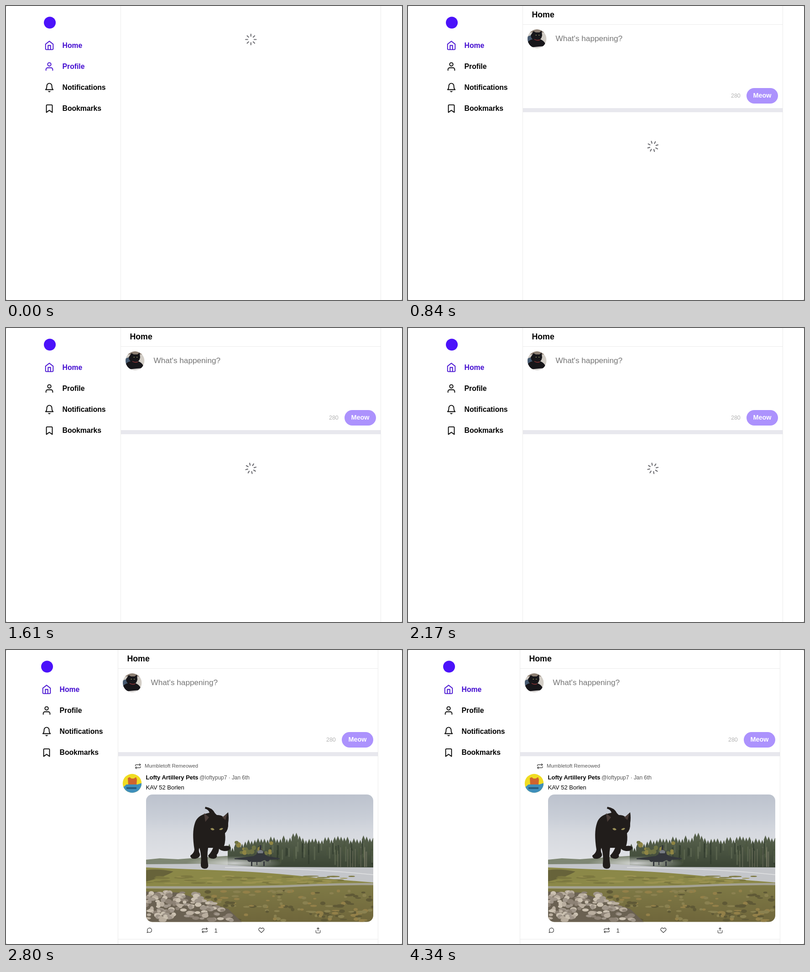
These frames come from a looping animation (868x645 px, 4.41 s). An HTML page:

```html
<!DOCTYPE html>
<html lang="en">
<head>
<meta charset="utf-8">
<title>Feed loading</title>
<style>
  html, body { margin: 0; width: 100%; height: 100%; overflow: hidden; background: #b8b8b8; }
  svg { display: block; }
  text { font-family: "Liberation Sans", Arial, Helvetica, sans-serif; white-space: pre; }
  .b { font-weight: 700; }
  .icon { fill: none; stroke: currentColor; stroke-width: 2; stroke-linecap: round; stroke-linejoin: round; }
  .nav { color: #000; fill: currentColor; font-size: 15.7px; font-weight: 700; }
  .nav.on { color: #430cd0; }
  .spin { stroke: #707075; stroke-width: 2.2; stroke-linecap: round; }
  .line { fill: #ebebeb; }
</style>
</head>
<body>
<svg width="868" height="645" viewBox="0 0 868 645">
  <defs>
    <linearGradient id="sky" x1="0" y1="0" x2="0" y2="1">
      <stop offset="0" stop-color="#bcc2cd"/><stop offset=".3" stop-color="#c9ced7"/>
      <stop offset=".5" stop-color="#d6d9df"/><stop offset="1" stop-color="#e4e5e8"/>
    </linearGradient>
    <linearGradient id="wood" x1="0" y1="0" x2="0" y2="1">
      <stop offset="0" stop-color="#5a644f"/><stop offset="1" stop-color="#3a4434"/>
    </linearGradient>
    <linearGradient id="field" x1="0" y1="0" x2="0" y2="1">
      <stop offset="0" stop-color="#7f7a46"/><stop offset="1" stop-color="#6f663b"/>
    </linearGradient>
    <radialGradient id="mist">
      <stop offset="0" stop-color="#e6e7e7" stop-opacity=".85"/><stop offset="1" stop-color="#e6e7e7" stop-opacity="0"/>
    </radialGradient>
    <clipPath id="frame"><rect x="307" y="317" width="498" height="279.5" rx="14"/></clipPath>
    <clipPath id="face"><circle cx="282.7" cy="72" r="20.7"/></clipPath>
    <clipPath id="face2"><circle cx="276.5" cy="292.5" r="20.7"/></clipPath>
  </defs>

  <rect width="868" height="645" rx="3" fill="#fff"/>

  <g id="shell">
    <rect class="line" x="251" width="1" height="645"/>
    <rect class="line" x="821" width="1" height="645"/>
    <circle cx="96" cy="36.5" r="13" fill="#4b12fa"/>
    <g id="nav"></g>
    <g id="compose">
      <text class="b" x="271.4" y="25" font-size="17.8">Home</text>
      <rect class="line" x="252" y="40" width="569" height="1"/>
      <g clip-path="url(#face)">
        <rect x="261" y="50" width="44" height="44" fill="#d2cdc6"/>
        <rect x="261" y="50" width="44" height="8" fill="#8d7f73"/>
        <path d="M261 68q7-6 15-2l2 14h-17z" fill="#475a70"/>
        <path d="M261 86h44v8h-44z" fill="#dcd9d8"/>
        <path d="M275 55l5 3h8l5-4 1 11q-1 5-4 8 8 3 11 10l-2 5-12 1-20 2-6-8q2-8 12-10-4-4-4-9z" fill="#17161a"/>
        <path d="M277 73q6 4 12 1" fill="none" stroke="#8f3436" stroke-width="1.5"/>
        <path d="M279.500 64h2.500M286 64h2.500" stroke="#8a9060" stroke-width="1.500"/>
      </g>
      <text x="323.500" y="77" font-size="17.200" fill="#757575">What's happening?</text>
      <text x="708" y="201" font-size="12.400" fill="#b3b3b3">280</text>
      <rect x="742" y="180" width="69" height="34" rx="17" fill="#ac92fd"/>
      <text class="b" x="776.500" y="201.300" font-size="14.400" fill="#fff" text-anchor="middle">Meow</text>
      <rect x="252" y="224" width="569" height="9" fill="#e8e8ee"/>
    </g>
  </g>

  <g id="pageSpin" class="spin"></g>
  <g id="feedSpin" class="spin"></g>

  <g id="feed">
    <text x="304" y="258" font-size="11.4" fill="#555">Mumbletoft Remeowed</text>
    <text class="b" x="306.5" y="284.3" font-size="13">Lofty Artillery Pets</text>
    <text x="424" y="284.3" font-size="11.9" fill="#555">@loftypup7 · Jan 6th</text>
    <text x="306.5" y="306.3" font-size="13">KAV 52 Borlen</text>
    <text x="456.5" y="619.5" font-size="13" fill="#333">1</text>
    <rect class="line" x="246" y="634" width="569" height="1"/>
    <g clip-path="url(#face2)">
      <rect x="255" y="271" width="43" height="43" fill="#f0dc22"/>
      <path d="M267 281l4-2 4 3h5l5-3 2 5-1 13h-18z" fill="#cf642e"/>
      <path d="M257 301l7-6h24l9-3 2 22h-42z" fill="#3f8fbb"/>
      <path d="M264 301h22v4h-22z" fill="#275c80"/>
    </g>
    <g clip-path="url(#frame)">
      <rect x="307" y="317" width="498" height="170" fill="url(#sky)"/>
      <path d="M307 460l30-3 40 2 40-3 80-5v24h-190z" fill="#7e8673"/>
      <path id="trees" fill="url(#wood)"/>
      <g id="leaves"></g>
      <ellipse cx="500" cy="468" rx="105" ry="16" fill="url(#mist)"/>
      <path d="M307 470l130-1 120 7 248 1v36l-498-30z" fill="#c4c6ca"/>
      <path d="M480 477q190 2 325 16" fill="none" stroke="#e2e3e4" stroke-width="1.5"/>
      <path d="M307 477q70 3 150 6 130 5 225 17l123 10v22h-498z" fill="#8b8848"/>
      <path d="M307 483q25-4 60 3-20 12-60 22z" fill="#67633a"/>
      <path d="M307 518q200 1 300-2 110-5 198-5v5q-100 1-200 6 -140 3-298 1z" fill="#a5a394"/>
      <path d="M307 524q160 0 300-3 110-6 198-5v81h-498z" fill="url(#field)"/>
      <g id="ground"></g>
      <g fill="#34373c">
        <path d="M501 457l42-5 6-4h18l6 4 27 5v2l-34 2-8 4h-18l-8-4-31-2z"/>
        <circle cx="558" cy="448" r="9"/>
        <path d="M556.500 428h3l1.500 14h-6z"/>
        <circle cx="534" cy="460" r="5"/><circle cx="573" cy="459" r="5"/>
        <path d="M537 464h3v10h-3zM564 464h3v10h-3zM549 464h2v8h-2z"/>
      </g>
      <path d="M551 442q7-7 13 0l-1 4h-11z" fill="#777c83"/>
      <path d="M437 344Q452 346 458 358L462 362Q472 362 476 366L487 356Q489 368 487 380
        Q488 394 480 402 482 418 478 430 490 428 492 434 490 442 478 441 470 440 467 436
        466 446 462 449 464 457 455 458 444 458 443 451 450 444 454 434L443 434
        Q440 452 443 470 445 480 435 480 426 479 427 470 429 450 424 434 421 440 425 447
        427 455 415 458 404 459 404 451 412 446 413 438 407 400 414 380
        418 366 434 360L446 357Q444 350 436 348z" fill="#211d1b"/>
      <path d="M434 358l11 9-8 10zM485 359l-4 14-7-6z" fill="#4a3c38"/>
      <path d="M448 392q5-4 9 2-5 4-9-2zM467 394q4-5 9-3-3 6-9 3z" fill="#9a8f58"/>
    </g>
    <g id="acts" color="#333"></g>
  </g>
</svg>
<script>
const $ = id => document.getElementById(id);

const shapes = {
  home: 'M3 9l9-7 9 7v11a2 2 0 0 1-2 2H5a2 2 0 0 1-2-2zM9 22V12h6v10',
  user: 'M20 21v-2a4 4 0 0 0-4-4H8a4 4 0 0 0-4 4v2M16 7a4 4 0 1 1-8 0a4 4 0 1 1 8 0z',
  bell: 'M18 8A6 6 0 0 0 6 8c0 7-3 9-3 9h18s-3-2-3-9M13.7 21a2 2 0 0 1-3.4 0',
  mark: 'M19 21l-7-5-7 5V5a2 2 0 0 1 2-2h10a2 2 0 0 1 2 2z',
  chat: 'M21 11.5a8.5 8.5 0 0 1-12.8 7.6L3 21l1.9-5.7A8.5 8.5 0 1 1 21 11.5z',
  loop: 'M18 2l4 4-4 4M2 11V9a3 3 0 0 1 3-3h17M6 22l-4-4 4-4M22 13v2a3 3 0 0 1-3 3H2',
  heart: 'M12 21l-8.8-8.6a5.5 5.5 0 0 1 7.8-7.8l1 1 1-1a5.5 5.5 0 0 1 7.8 7.8z',
  share: 'M4 12v8a2 2 0 0 0 2 2h12a2 2 0 0 0 2-2v-8M16 6l-4-4-4 4M12 2v13'
};
const icon = (name, cx, cy, k) =>
  `<path class="icon" transform="translate(${cx} ${cy}) scale(${k}) translate(-12 -12)" d="${shapes[name]}"/>`;

$('nav').innerHTML = [['home', 'Home'], ['user', 'Profile'], ['bell', 'Notifications'], ['mark', 'Bookmarks']]
  .map(([name, label], i) => {
    const y = 86.5 + 46.2 * i;
    return `<g class="nav" id="${name}">${icon(name, 95, y, .92)}<text x="123.6" y="${y + 5.2}">${label}</text></g>`;
  }).join('');
$('home').classList.add('on');

$('acts').innerHTML = icon('loop', 289.3, 255, .57) + icon('chat', 314.3, 615, .57) +
  icon('loop', 435.6, 615, .57) + icon('heart', 559.8, 615, .57) + icon('share', 684, 615, .57);

let spokes = '';
for (let i = 0; i < 8; i++) spokes += `<path d="M0-7.2V-11.6" transform="rotate(${i * 45})"/>`;
$('pageSpin').innerHTML = $('feedSpin').innerHTML = spokes;

// Photo texture
let seed = 7;
const rnd = (a, b) => {
  seed = seed * 16807 % 2147483647;
  return a + (b - a) * seed / 2147483647;
};
const blob = (x, y, rx, ry, fill) => `<ellipse cx="${x}" cy="${y}" rx="${rx}" ry="${ry}" fill="${fill}"/>`;

let wood = 'M486 478', leaves = '';
for (let x = 486; x < 808; x += 7) {
  const rise = Math.min(1, (x - 486) / 60);
  const top = 432 - 19 * rise + rnd(-7, 5) - (Math.abs(x - 628) < 6 ? 15 : 0);
  wood += `L${x} ${top + 9}L${x + 3.5} ${top}L${x + 7} ${top + 9}`;
}
$('trees').setAttribute('d', wood + 'V478z');

for (let i = 0; i < 60; i++) {
  const y = rnd(420, 440);
  leaves += `<path d="M${rnd(545, 804)} ${y}V${y + rnd(15, 34)}" stroke="${['#2f392c', '#667058', '#4c573f'][i % 3]}" stroke-width="3" opacity=".6"/>`;
}
for (let i = 0; i < 16; i++)
  leaves += blob(rnd(505, 582), rnd(422, 446), rnd(3, 6), rnd(3, 6), i % 2 ? '#8f8544' : '#6f7344');
for (let i = 0; i < 12; i++)
  leaves += `<path d="M${rnd(690, 800)} ${rnd(430, 445)}V476" stroke="#85836f" stroke-width=".8"/>`;
$('leaves').innerHTML = leaves;

let ground = '';
for (let i = 0; i < 60; i++)
  ground += blob(rnd(307, 760), rnd(496, 513), rnd(6, 18), rnd(1, 2.5), i % 2 ? '#9a9250' : '#7c7840');
for (let i = 0; i < 150; i++)
  ground += blob(rnd(440, 805), rnd(528, 594), rnd(3, 9), rnd(1.5, 4), ['#8a8150', '#5f5936', '#938049'][i % 3]);
ground += '<path d="M307 530l70 2 50 16 60 20 30 29h-210z" fill="#6a6152"/>';
for (let i = 0; i < 130; i++) {
  const y = 531 + i * .48;
  ground += blob(rnd(307, 410 + (y - 528) * 1.6), y, rnd(4, 9), rnd(2.5, 5.5), ['#b9ae9f', '#a0968a', '#cbc1b1', '#8d8275'][i % 4]);
}
$('ground').innerHTML = ground;

// Timeline
const LOOP = 4410, STEP = 70, COMPOSE = 840, FEED = 2800;
const show = (id, on) => $(id).style.display = on ? '' : 'none';
const turn = (id, y, deg) => $(id).setAttribute('transform', `translate(536.8 ${y}) rotate(${deg})`);

function draw(now) {
  const t = now % LOOP, n = Math.floor(t / STEP);
  const home = t >= COMPOSE, feed = t >= FEED;
  show('pageSpin', !home);
  show('compose', home);
  show('feedSpin', home && !feed);
  show('feed', feed);
  $('user').classList.toggle('on', !home);
  $('shell').setAttribute('transform', `translate(${feed ? -6 : 0} 0)`);
  turn('pageSpin', 73.5, 45 * n);
  turn('feedSpin', 308, 45.3 * n - 20.5);
}
function loop() {
  draw(performance.now());
  requestAnimationFrame(loop);
}
loop();
</script>
</body>
</html>
```
